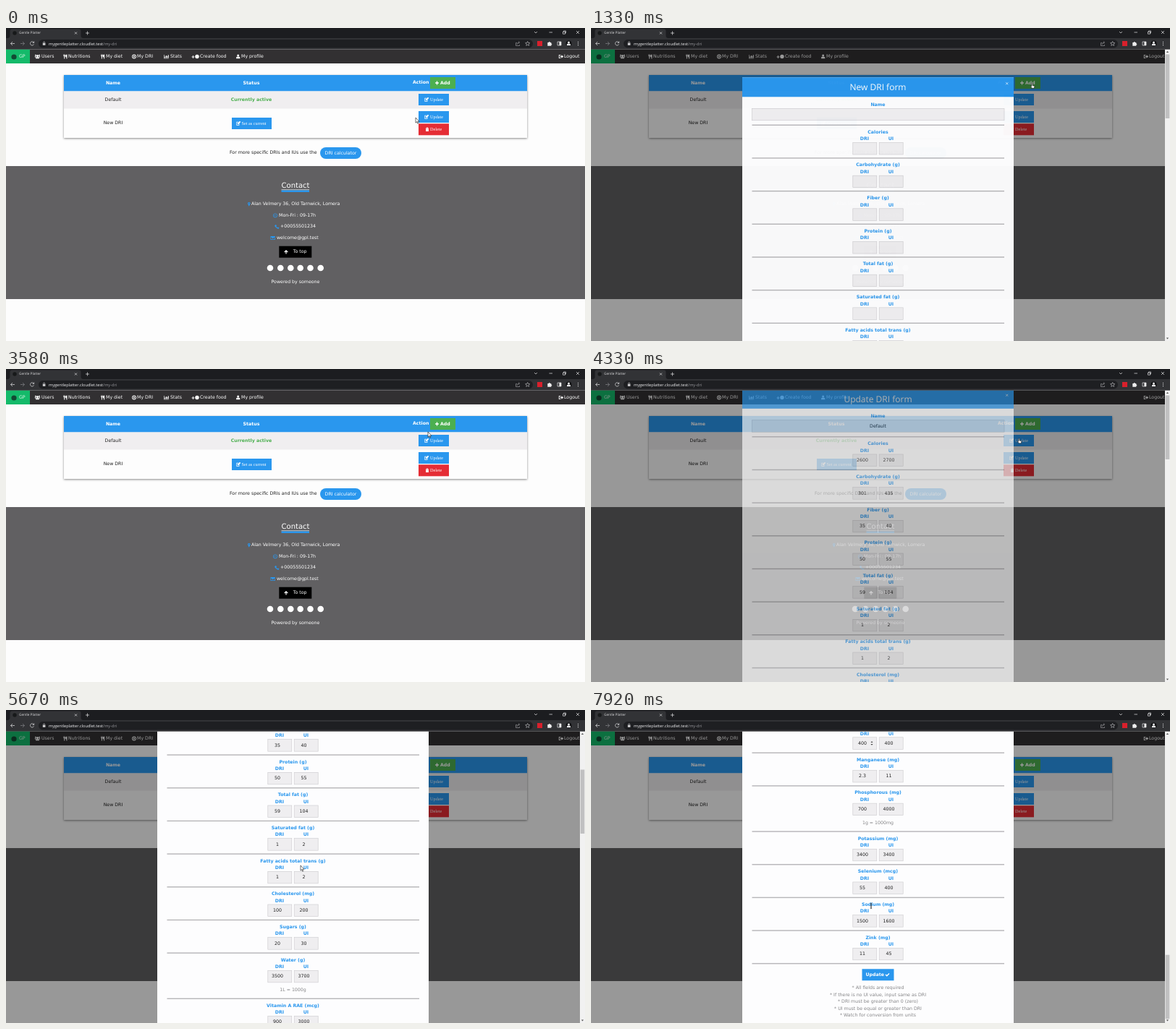
An HTML page for the animation above (8 s loop, 800 by 433 pixels).

```html
<!DOCTYPE html>
<html lang="en">
<head>
<meta charset="utf-8">
<title>Nutrition settings</title>
<style>
  html, body { margin: 0; width: 100%; height: 100%; overflow: hidden; background: #fdfdfd; }
  svg { display: block; width: 100%; height: 100%; }
  text { font: 6.25px "DejaVu Sans", sans-serif; dominant-baseline: central; text-rendering: geometricPrecision; white-space: pre; }
  .m { text-anchor: middle; }
  .b { font-weight: bold; }
  .serif { font-family: "Liberation Serif", serif; }
  .ui { font-family: "Open Sans", sans-serif; font-size: 5.6px; }
  .tab { font-size: 4.7px; }
  .title { font-size: 12px; }
  .big { font-size: 10px; }
  .card { filter: drop-shadow(0 1.5px 1.6px #0007); }
</style>
</head>
<body>
<svg id="stage" viewBox="0 0 800 433"></svg>
<script>
const BLUE = '#2a97ee', GREEN = '#4caf50', RED = '#e52d35', INK = '#222', WHITE = '#fff';
const LOOP = 8000, FPS = 12;

// Drawing helpers
const rect = (x, y, w, h, fill, extra = '') =>
  `<rect x="${x}" y="${y}" width="${w}" height="${h}" fill="${fill}" ${extra}/>`;
const text = (x, y, s, cls = '', fill = WHITE) =>
  `<text x="${x}" y="${y}" class="${cls}" fill="${fill}">${s}</text>`;
const circle = (x, y, r, fill) => `<circle cx="${x}" cy="${y}" r="${r}" fill="${fill}"/>`;
const line = (d, color = '#e4e4e6', width = .7) =>
  `<path d="${d}" fill="none" stroke="${color}" stroke-width="${width}"/>`;
const disc = (r, x = 0, y = 0) =>
  `M${x - r} ${y}a${r} ${r} 0 1 1 ${2 * r} 0a${r} ${r} 0 1 1 ${-2 * r} 0z`;

const ICONS = {
  users: disc(1.6, 0, -1) + 'M-2.4 2.8v-1.2q0-.8 1-.8h2.8q1 0 1 .8v1.2z' + disc(1, -2.6, -1.7) + disc(1, 2.6, -1.7) +
    'M-3.6 1v-1.4h1.4v1.4zM3.6 1v-1.4h-1.4v1.4z',
  user: disc(1.5, 0, -1.5) + 'M-2.6 2.8v-1.4q0-1.2 1.4-1.2h2.4q1.4 0 1.4 1.2v1.4z',
  cutlery: 'M-2.6-3h.6v1.8h.4v-1.8h.6v1.8h.4v-1.8h.6v2.2l-.8.8v3h-1v-3l-.8-.8zM2.4-3v6h-1v-2.2h-1.2v-2q0-1.8 2.2-1.8z',
  target: disc(2.9) + disc(2) + disc(1.1),
  bars: 'M-3.4-2.6h.6v4.8h6.2v.6h-6.8zM-2.2 0h1v1.8h-1zM-.7-1.6h1v3.4h-1zM.8-.8h1v2.6h-1zM2.3-2.2h1v4h-1z',
  plus: 'M-.7-2.4h1.4v1.7h1.7v1.4h-1.7v1.7h-1.4v-1.7h-1.7v-1.4h1.7z',
  edit: 'M1.4 2.7h-4v-5h3l-.8.8h-1.4v3.4h2.4v-1l.8-.8zM-.9.9v-1.3l2.9-2.9 1.3 1.3-2.9 2.9z',
  trash: 'M-2.2-1.9h1.4v-.8h1.6v.8h1.4v.8h-4.4zM-1.9-.8h3.8v3.6h-3.8z',
  pin: 'M0 3l-1.6-3.2a1.8 1.8 0 1 1 3.2 0z' + disc(.7, 0, -1),
  clock: disc(2.9) + disc(2.2) + 'M-.3-1.5h.6v1.9h-1.5v-.6h.9z',
  phone: 'M-2.6-2.4l1.2-.4.8 1.6-.7.7 1.8 1.8.7-.7 1.6.8-.4 1.2q-1 .6-3-.8t-2.8-3z',
  mail: 'M-3.2-2.4h6.4v4.8h-6.4zM-2.6-1.2v3h5.2v-3l-2.6 1.9z',
  up: 'M0-2.8l2.8 2.8-.9.9-1.3-1.3v3.2h-1.2v-3.2l-1.3 1.3-.9-.9z',
  check: 'M-3 .1l1-1 1.3 1.3 2.7-2.7 1 1-3.7 3.7z',
  logout: 'M-.6-2.5h-2.6v5h2.6v-.8h-1.7v-3.4h1.7zM-1.2-.8h1.8v-1.5l2.6 2.3-2.6 2.3v-1.5h-1.8z'
};
const icon = (name, x, y, fill = WHITE) =>
  `<path d="${ICONS[name]}" transform="translate(${x} ${y})" fill="${fill}" fill-rule="evenodd"/>`;

function browserBar() {
  return rect(0, 0, 800, 15, '#1c1d20') + rect(0, 14, 800, 15.5, '#323336') +
    `<path d="M3 14q2.5-.3 2.5-3v-6.5q0-3 3-3h92q3 0 3 3v6.5q0 2.7 2.5 3z" fill="#323336"/>` +
    circle(12, 7, 2.7, '#17191a') + text(18, 7, 'Gentle Platter', 'ui tab', '#dcdcde') +
    line('M95 5.5l3 3m0-3l-3 3M110 7h5m-2.5-2.5v5M730 5l2 2 2-2M750.5 6h4.5M788 4l4 4m0-4l-4 4') +
    line('M769.5 5.2h3v3h-3zm1-.1v-1.1h3v3h-1') +
    rect(45, 16, 683, 11.5, '#1e1f22', 'rx="5.7"') +
    line('M12 21.5h-5.5m2.5-2.5l-2.5 2.5 2.5 2.5') +
    line('M20 21.5h5.5m-2.5-2.5l2.5 2.5-2.5 2.5', '#85868a') +
    line('M38.3 20a2.6 2.6 0 1 0 .2 2.4M38.7 18.5v2h-2') +
    rect(50.8, 20.8, 3.6, 3, '#cfcfd1') + line('M51.6 21v-1.2a1 1 0 0 1 2 0v1.2', '#cfcfd1', .6) +
    text(59, 21.5, 'mygentleplatter.cloudlet.test<tspan fill="#98999d">/my-dri</tspan>', 'ui', '#f0f0f2') +
    line('M706 20.5h-1.5v4h5v-1.5M706 23q.3-3 3.3-3m-1.3-1.5l1.6 1.5-1.6 1.5', '#a9aaad', .6) +
    line('M720.7 18.5l.9 2 2.2.2-1.7 1.5.5 2.2-1.9-1.2-1.9 1.2.5-2.2-1.7-1.5 2.2-.2z', '#c8c8cb', .6) +
    rect(734, 18, 7, 7, '#d8202c') +
    `<path d="M748.3 20h1.5a1 1 0 0 1 2 0h1.5v1.5a1 1 0 0 1 0 2v1.3h-5z" fill="#eee"/>` +
    line('M762 19h5v5h-5z') + rect(764.5, 19, 2.5, 5, WHITE) +
    circle(777.5, 21.5, 4, '#111214') + icon('user', 777.5, 21.5, '#e8e8ea') +
    [19.3, 21.5, 23.7].map(y => circle(790.5, y, .6, '#e4e4e6')).join('');
}

function navBar() {
  const items = [
    ['users', 43.5, 'Users', 49], ['cutlery', 82, 'Nutritions', 86], ['cutlery', 133.7, 'My diet', 138],
    ['target', 177, 'My DRI', 181], ['bars', 221.5, 'Stats', 227], ['user', 320.7, 'My profile', 325],
    ['logout', 767, 'Logout', 771]
  ];
  return rect(0, 29.5, 800, 19.5, '#323032') + rect(0, 29.5, 33, 19.5, '#14ba6a') +
    circle(11, 40, 3.6, '#124a33') + text(18, 39.7, 'GP', '', '#d9f7e6') +
    items.map(([name, ix, label, x]) => icon(name, ix, 39.5) + text(x, 39.7, label)).join('') +
    line('M256.5 40h4m-2-2v4', WHITE, .9) + circle(264, 39.5, 2.7, WHITE) + text(268, 39.7, 'Create food');
}

function button(x, y, w, color, glyph, glyphX, label, labelX, cls = 'serif') {
  return rect(x, y, w, 16, color) + icon(glyph, glyphX, y + 8) + text(labelX, y + 8.2, label, cls);
}

function table() {
  return `<g class="card">${rect(80, 65, 640, 87, '#fdfdfd')}</g>` +
    rect(80, 65, 640, 22.5, BLUE) + rect(80, 87.5, 640, 24, '#f0eef0') +
    text(148, 76, 'Name', 'm b') + text(339, 76, 'Status', 'm b') + text(562, 75.5, 'Action', 'b') +
    button(586, 68, 35, GREEN, 'plus', 595.5, 'Add', 600, 'b') +
    text(148, 99.8, 'Default', 'm', INK) + text(339, 99.8, 'Currently active', 'm b', GREEN) +
    text(148, 131.8, 'New DRI', 'm', INK) +
    button(312, 124, 55, BLUE, 'edit', 321, 'Set as current', 325.5) +
    [91, 115].map(y => button(570, y, 42, BLUE, 'edit', 581, 'Update', 586)).join('') +
    button(570, 132.3, 42, RED, 'trash', 582, 'Delete', 586) +
    text(309, 172.3, 'For more specific DRIs and IUs use the', '', INK) +
    rect(434, 165, 57, 16, BLUE, 'rx="8"') + text(462.5, 173, 'DRI calculator', 'm');
}

function footer() {
  const contacts = [
    ['pin', 335.8, 339, 'Alan Velmery 36, Old Tarnwick, Lomera'], ['clock', 372, 377, 'Mon-Fri : 09-17h'],
    ['phone', 374.5, 379, '+00055501234'], ['mail', 368.7, 374, 'welcome@gpl.test']
  ];
  return rect(0, 191, 800, 184, '#616062') + text(400, 218.7, 'Contact', 'm big') +
    rect(380.5, 223.5, 38.5, .7, WHITE) + rect(380.5, 224.5, 38.5, 2.5, BLUE) +
    contacts.map(([name, ix, x, s], i) =>
      icon(name, ix, 243.7 + i * 15.6, BLUE) + text(x, 243.7 + i * 15.6, s)).join('') +
    button(377.3, 301.7, 45, '#000', 'up', 387, 'To top', 396.7, '') +
    [365, 379.3, 393.3, 406.7, 420.5, 434.7].map(x => circle(x, 332, 4.3, WHITE)).join('') +
    text(400, 351, 'Powered by someone', 'm');
}

// label | DRI | UI | optional note
const NUTRIENTS = `Calories|2600|2700
Carbohydrate (g)|301|435
Fiber (g)|35|40
Protein (g)|50|55
Total fat (g)|59|104
Saturated fat (g)|1|2
Fatty acids total trans (g)|1|2
Cholesterol (mg)|100|200
Sugars (g)|20|30
Water (g)|3500|3700|1L = 1000g
Vitamin A RAE (mcg)|900|3000
Thiamin - B1 (mg)|1.2|1.2
Riboflavin - B2 (mg)|1.3|1.3
Niacin - B3 (mg)|16|35
Pantothenic acid - B5 (mg)|5|5
Vitamin B6 (mg)|1.3|100
Folate - B9 (mcg)|400|1000
Vitamin B12 (mcg)|2.4|2.4
Choline (mg)|550|3500
Vitamin C (mg)|90|2000
Vitamin D (mcg)|15|100
Vitamin E (mg)|15|1000
Vitamin K (mcg)|120|120
Calcium (mg)|1000|2500|1g = 1000mg
Copper (mg)|0.9|10
Fluoride (mg)|4|10
Iron (mg)|8|45
Magnesium (mg)|400|400
Manganese (mg)|2.3|11
Phosphorous (mg)|700|4000|1g = 1000mg
Potassium (mg)|3400|3400
Selenium (mcg)|55|400
Sodium (mg)|1500|1600
Zink (mg)|11|45`.split('\n').map(row => row.split('|'));

const HINTS = ['All fields are required', 'If there is no UI value, input same as DRI',
  'DRI must be greater than 0 (zero)', 'UI must be equal or greater than DRI', 'Watch for conversion from units'];

function form(id, title, filled) {
  const field = (x, y, w, value, cx) =>
    rect(x, y, w, 16.5, '#efeef0', 'stroke="#cbcacd" stroke-width=".6"') +
    (filled ? text(cx, y + 8.4, value, 'm', INK) : '');
  const divider = y => rect(222.5, y - .7, 348.5, 1.4, '#b6b5b8');
  let y = 137;
  let body = rect(209, 71, 375, 27, BLUE) + text(396.5, 84.5, title, 'm ui title') +
    line('M573.2 78l3 3m0-3l-3 3', WHITE, .7) +
    text(396.5, 109, 'Name', 'm b', BLUE) + field(222.5, 114, 348.5, 'Default', 396.5) + divider(y);
  for (const [label, dri, ui, note] of NUTRIENTS) {
    body += text(396.5, y + 10, label, 'm b', BLUE) +
      text(378, y + 19.5, 'DRI', 'm b', BLUE) + text(414.5, y + 19.5, 'UI', 'm b', BLUE) +
      field(361.8, y + 24.2, 33, dri, 375) + field(398.2, y + 24.2, 33, ui, 411.5);
    if (filled && label.startsWith('Magnesium'))
      body += `<path id="spinner" transform="translate(388 ${y + 32.4})" d="M-1.6-.9l1.6-1.9 1.6 1.9zM-1.6.9l1.6 1.9 1.6-1.9z" fill="#444"/>`;
    if (note) {
      body += text(396.5, y + 51.7, note, 'm', '#858587');
      y += 17.5;
    }
    y += 45.67;
    body += divider(y);
  }
  body += rect(374.5, y + 7.5, 44, 16, BLUE) + text(379.5, y + 15.7, 'Update', 'b') + icon('check', 409.5, y + 15.5) +
    HINTS.map((s, i) => text(396.5, y + 34.2 + i * 9.4, '* ' + s, 'm', '#858587')).join('');
  return `<g id="${id}">${rect(209, 71, 375, y + 30, '#fdfdfe')}${body}</g>`;
}

const pointer = (id, d) =>
  `<path id="${id}" d="${d}" fill="#fff" stroke="#111" stroke-width=".6" stroke-linejoin="round"/>`;

const stage = document.getElementById('stage');
stage.innerHTML = `
  <clipPath id="viewport">${rect(0, 29.5, 793, 403.5, '#000')}</clipPath>
  ${rect(0, 0, 800, 433, '#fdfdfd')}${table()}${footer()}${navBar()}
  <g id="modal">
    ${rect(0, 29.5, 793, 403.5, '#000', 'opacity=".4"')}
    <g clip-path="url(#viewport)">${form('newForm', 'New DRI form', false)}${form('updateForm', 'Update DRI form', true)}</g>
    ${rect(793, 29.5, 7, 403.5, '#f1f1f1')}
    <path d="M794.8 34l1.7-2 1.7 2zM794.8 428.5l1.7 2 1.7-2z" fill="#555"/>
    <rect id="thumb" x="793.7" width="5.6" height="88.5" fill="#c0c0c1"/>
  </g>
  ${browserBar()}
  <g id="cursor">
    ${pointer('arrow', 'M0 0v7.2l1.6-1.5 1.1 2.5 1-.4-1.1-2.5h2.3z')}
    ${pointer('hand', 'M-.6 0q.6-.8 1.2 0v2.6l2.2.5q.6.2.5.9l-.5 2.3h-3l-1.8-2.4q.3-.8 1.2-.2z')}
    <path id="beam" d="M-1.2-3.8q1.2 0 1.2.8v6q0 .8-1.2.8M1.2-3.8q-1.2 0-1.2.8v6q0 .8 1.2.8" fill="none" stroke="#111" stroke-width=".6"/>
  </g>`;
const $ = id => document.getElementById(id);
const show = (id, on) => { $(id).style.display = on ? '' : 'none'; };
const move = (id, x, y) => $(id).setAttribute('transform', `translate(${x} ${y})`);

// Motion: [time, values...]
const CURSOR = [[150, 566, 124], [830, 609.5, 77], [2300, 609.5, 77], [2900, 574, 76], [3150, 574, 76],
  [3580, 583, 87], [3900, 591.5, 96.5], [4400, 591.5, 96.5], [5000, 407, 215], [5670, 407, 215],
  [6580, 402.5, 217], [7450, 387, 271]];
const HAND_TIMES = [[790, 2380], [2850, 3100], [3850, 4480]];
const SCROLL = [[5083, 0], [5667, 212], [6583, 542.5], [7490, 1165], [7880, 1391.5]];
const NEW_OPEN = 992, NEW_CLOSE = 3080, UPDATE_OPEN = 4164, BEAM_FROM = 7490;

function track(keys, t, ease = p => p) {
  const i = keys.findIndex(k => k[0] > t);
  if (i === 0) return keys[0].slice(1);
  if (i < 0) return keys[keys.length - 1].slice(1);
  const a = keys[i - 1], b = keys[i], p = ease((t - a[0]) / (b[0] - a[0]));
  return a.slice(1).map((v, j) => v + (b[j + 1] - v) * p);
}
const smooth = p => p * p * (3 - 2 * p);

// CSS "ease": cubic-bezier(.25, .1, .25, 1)
function cssEase(x) {
  if (x <= 0) return 0;
  if (x >= 1) return 1;
  const curve = (a, b, s) => 3 * a * s * (1 - s) ** 2 + 3 * b * s * s * (1 - s) + s ** 3;
  let low = 0, high = 1;
  for (let i = 0; i < 20; i++) {
    const mid = (low + high) / 2;
    if (curve(.25, .25, mid) < x) low = mid; else high = mid;
  }
  return curve(.1, 1, low);
}

function placeForm(id, on, age, scroll) {
  show(id, on);
  const p = cssEase((age - 17) / 400);
  move(id, 0, -125 * (1 - p) - scroll);
  $(id).setAttribute('opacity', p);
}

function draw(now) {
  const t = Math.floor((now % LOOP + 3.4) * FPS / 1000) * 1000 / FPS;
  const adding = t >= NEW_OPEN && t < NEW_CLOSE, updating = t >= UPDATE_OPEN;
  const [scroll] = track(SCROLL, t);
  show('modal', adding || updating);
  placeForm('newForm', adding, t - NEW_OPEN, 0);
  placeForm('updateForm', updating, t - UPDATE_OPEN, scroll);
  $('thumb').setAttribute('y', 36.5 + scroll * .2172);

  const beam = t >= BEAM_FROM, hand = HAND_TIMES.some(([a, b]) => t >= a && t < b);
  show('beam', beam);
  show('spinner', beam);
  show('hand', hand);
  show('arrow', !beam && !hand);
  move('cursor', ...track(CURSOR, t, smooth));
  requestAnimationFrame(() => draw(performance.now()));
}
draw(performance.now());
</script>
</body>
</html>
```
